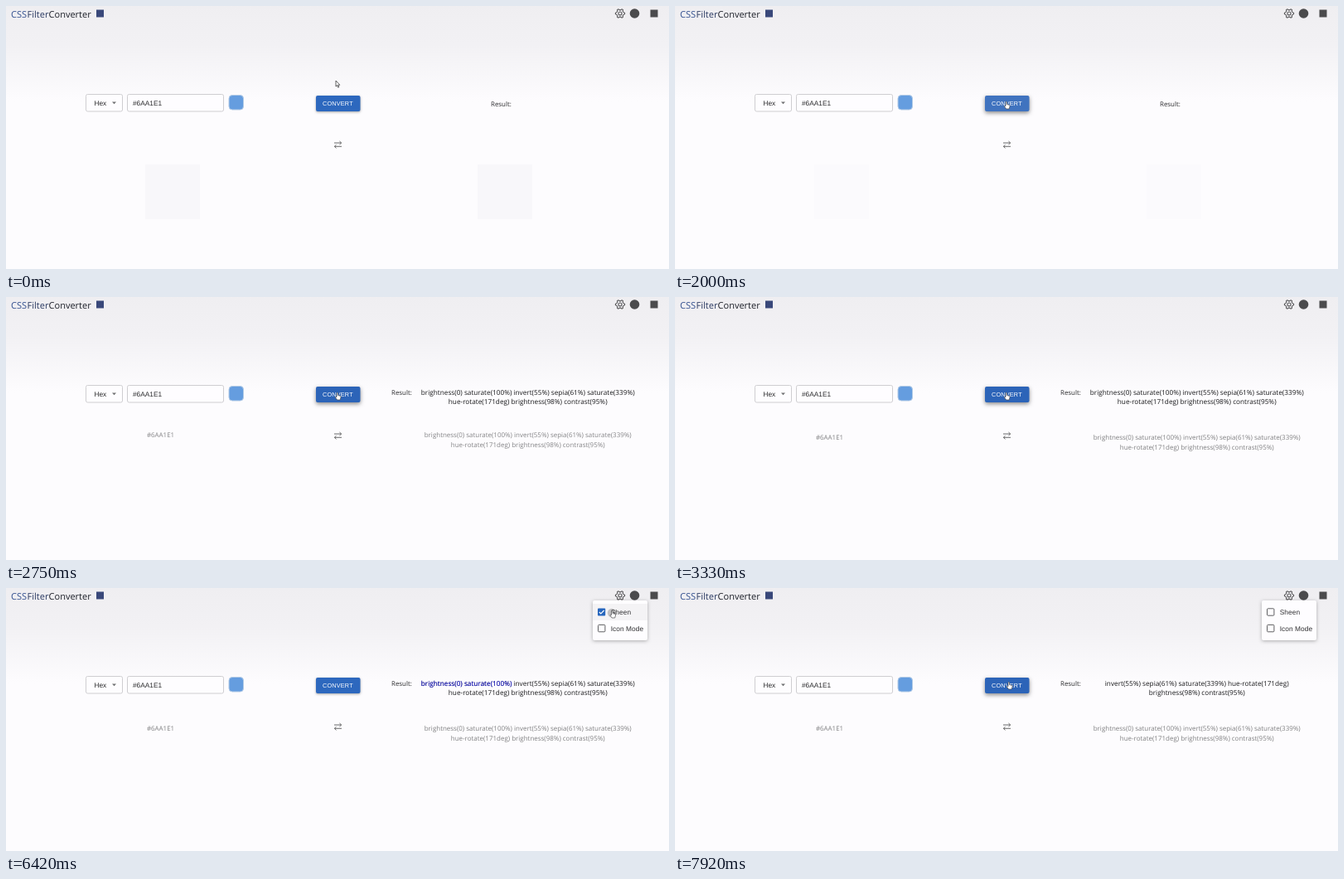
An HTML page with a canvas that plays this animation: 800x317 px, repeating every 8 s.

```html
<!DOCTYPE html>
<html lang="en">
<head>
<meta charset="utf-8">
<title>CSS Filter Converter</title>
<style>
  html, body { margin: 0; height: 100%; overflow: hidden; background: #fdfcfe; }
  canvas { display: block; }
</style>
</head>
<body>
<canvas width="800" height="317"></canvas>
<script>
const LOOP = 8000;
const ctx = document.querySelector('canvas').getContext('2d');
const UI = '"Liberation Sans", Arial, sans-serif';
const BODY = '"Open Sans", "Noto Sans", sans-serif';
const FILTER = ['brightness(0) saturate(100%) invert(55%) sepia(61%) saturate(339%)',
                'hue-rotate(171deg) brightness(98%) contrast(95%)'];
const SHORT = ['invert(55%) sepia(61%) saturate(339%) hue-rotate(171deg)',
               'brightness(98%) contrast(95%)'];
const BUTTON = [374, 108, 53.5, 19];
const GEAR = [734, 2, 14, 14];
const MENU = [708, 15, 66, 48];
const ROW = [708, 19, 66, 20];

const progress = (t, start, end) => Math.min(1, Math.max(0, (t - start) / (end - start)));
const smooth = p => p * p * (3 - 2 * p);
const easeOut = (p, power = 2) => 1 - (1 - p) ** power;

// cubic-bezier(.4, 0, .2, 1)
function standard(p) {
  let lo = 0, hi = 1;
  for (let i = 0; i < 14; i++) {
    const u = (lo + hi) / 2, v = 1 - u;
    if (1.2 * u * v * v + 0.6 * u * u * v + u ** 3 < p) lo = u; else hi = u;
  }
  return lo * lo * (3 - 2 * lo);
}

const moves = [
  { start: 1170, end: 1560, x: 399, y: 115, ease: smooth },
  { start: 3480, end: 4230, x: 738, y: 10, ease: smooth },
  { start: 4720, end: 5080, x: 730.5, y: 27, ease: smooth },
  { start: 6680, end: 7850, x: 402, y: 113, ease: easeOut },
];

function pointerAt(t) {
  let x = 398, y = 90;
  for (const m of moves) {
    const k = m.ease(progress(t, m.start, m.end));
    x += (m.x - x) * k;
    y += (m.y - y) * k;
  }
  return { x, y };
}

const inside = (p, [x, y, w, h]) => p.x >= x && p.x <= x + w && p.y >= y && p.y <= y + h;

function text(str, x, y, size, color, { font = UI, align = 'left', spacing = 0 } = {}) {
  ctx.font = `${size}px ${font}`;
  ctx.textAlign = align;
  ctx.letterSpacing = spacing + 'px';
  ctx.fillStyle = color;
  ctx.fillText(str, x, y);
}

function box(x, y, w, h, r, fill, stroke) {
  ctx.beginPath();
  ctx.roundRect(x, y, w, h, r);
  if (fill) { ctx.fillStyle = fill; ctx.fill(); }
  if (stroke) { ctx.strokeStyle = stroke; ctx.lineWidth = 1; ctx.stroke(); }
}

function disc(x, y, r, fill) {
  ctx.beginPath();
  ctx.arc(x, y, r, 0, 7);
  ctx.fillStyle = fill;
  ctx.fill();
}

function path(d, fill, stroke, width = 1) {
  const p = new Path2D(d);
  ctx.lineWidth = width;
  if (fill) { ctx.fillStyle = fill; ctx.fill(p); }
  if (stroke) { ctx.strokeStyle = stroke; ctx.stroke(p); }
}

function layer(alpha, draw) {
  ctx.save();
  ctx.globalAlpha = alpha;
  draw();
  ctx.restore();
}

function shadow(blur, dy, alpha) {
  ctx.shadowColor = `rgba(0,0,0,${alpha})`;
  ctx.shadowBlur = blur;
  ctx.shadowOffsetY = dy;
}

function ripple(area, x, y, radius, color) {
  ctx.save();
  ctx.beginPath();
  ctx.rect(...area);
  ctx.clip();
  disc(x, y, radius, color);
  ctx.restore();
}

function gear(color) {
  ctx.beginPath();
  for (let i = 0; i < 24; i++) {
    const a = (i + 0.5) * Math.PI / 12, r = i % 4 < 2 ? 5.6 : 4.2;
    ctx.lineTo(741 + r * Math.cos(a - 0.26), 9 + r * Math.sin(a - 0.26));
  }
  ctx.closePath();
  ctx.moveTo(743, 9);
  ctx.arc(741, 9, 2, 0, 7);
  ctx.strokeStyle = color;
  ctx.lineWidth = 1.1;
  ctx.stroke();
}

function header(gearColor) {
  const sheen = ctx.createLinearGradient(0, 0, 0, 115);
  sheen.addColorStop(0, '#efeef1');
  sheen.addColorStop(0.4, '#f2f1f4');
  sheen.addColorStop(1, '#fdfcfe');
  ctx.fillStyle = sheen;
  ctx.fillRect(0, 0, 800, 317);
  const font = { font: BODY };
  text('CSS', 6, 14, 11, '#33508f', font);
  text('Filter', 25.6, 14, 11, '#2b3a62', font);
  text('Converter', 51.6, 14, 11, '#1d2029', font);
  box(109, 4.5, 9, 9, 0, '#39487a');
  gear(gearColor);
  disc(758.5, 9, 5.8, '#4b4b4d');
  box(777.5, 4.5, 9, 9, 0, '#4b4b4d');
}

function form(hover, t) {
  box(96.5, 106.5, 44, 20.5, 2, '#fefdff', '#cfced1');
  text('Hex', 106.5, 119.5, 8.3, '#2a2a2c');
  path('M128 115.5h5l-2.5 2.7z', '#707072');
  box(146.5, 106.5, 116, 20.5, 2, '#fefdff', '#cfced1');
  text('#6AA1E1', 153, 119.5, 8.3, '#2a2a2c');
  box(269, 107.5, 17.5, 17.5, 4, '#659ddf', '#b3cbe6');

  ctx.save();
  shadow(hover ? 5 : 3, hover ? 2 : 1, hover ? 0.45 : 0.35);
  box(...BUTTON, 2, hover ? '#2c64b8' : '#2d68be');
  ctx.restore();
  const spread = progress(t, 1620, 2170);
  if (spread > 0 && spread < 1) {
    ripple(BUTTON, 400, 117, 4 + 40 * easeOut(spread), `rgba(255,255,255,${0.3 * (1 - spread)})`);
  }
  text('CONVERT', 382, 120.1, 7.26, '#fff', { spacing: 0.207 });
  path('M396 165h8.5M402.5 163l2.2 2l-2.2 2M405 169.3h-8.5M398.5 167.3l-2.2 2l2.2 2', null, '#58585a', 0.9);
}

function lines(rows, y, size, color) {
  rows.forEach((row, i) =>
    text(row, 629.7, y + i * 11.4, size, color, { font: BODY, align: 'center' }));
}

function results(t) {
  const shown = t >= 2170;
  text('Result:', shown ? 465 : 585, shown ? 118 : 120.5, 7.9, '#2b2b2d', { font: BODY });
  const marks = 1 - progress(t, 1750, 2250);
  if (marks) layer(marks, () => [201, 602].forEach(x => box(x - 33, 191, 66, 66, 0, '#f8f7fa')));

  layer(easeOut(progress(t, 2170, 2700)), () => {
    lines(t < 6500 ? FILTER : SHORT, 118, 8.23, '#1b1b1d');
    const blue = progress(t, 4950, 5150);
    if (blue && t < 6500) {
      ctx.font = `8.23px ${BODY}`;
      const left = 629.7 - ctx.measureText(FILTER[0]).width / 2;
      ctx.globalAlpha *= blue;
      text('brightness(0) saturate(100%)', left, 118, 8.23, '#3030ee', { font: BODY });
    }
  });

  const p = progress(t, 2330, 3000);
  layer(easeOut(p, 3), () => {
    const y = 172.4 - 22 * (1 - p) ** 2;
    text('#6AA1E1', 186.5, y, 7.95, '#808082', { font: BODY, align: 'center' });
    lines(FILTER, y, 7.98, '#808082');
  });
}

function checkbox(y, checked) {
  if (!checked) return box(714.5, y - 4.2, 8.4, 8.4, 1, null, '#5f5f61');
  box(714, y - 4.6, 9.2, 9.2, 1, '#2666bd');
  path(`M715.8 ${y}l2 2l3.8 -4`, null, '#fff', 1.1);
}

function menu(t, hoverRow) {
  if (t < 4407) return;
  const grow = standard(progress(t, 4407, 4593));
  layer(standard(progress(t, 4407, 4687)), () => {
    ctx.translate(740, 15);
    ctx.scale(0.75 + 0.25 * grow, 0.5625 + 0.4375 * grow);
    ctx.translate(-740, -15);
    ctx.save();
    shadow(4, 1, 0.3);
    box(...MENU, 2, '#fefdff');
    ctx.restore();
    if (hoverRow) box(...ROW, 0, '#f4f3f5');
    const spread = progress(t, 6385, 6935);
    if (spread > 0 && spread < 1) {
      ripple(ROW, 731, 30, 3 + 34 * spread, `rgba(0,0,0,${0.22 * (1 - spread)})`);
    }
    checkbox(29, t < 6500);
    checkbox(48.6, false);
    text('Sheen', 729.7, 32, 8.3, '#303032', { spacing: 0.078 });
    text('Icon Mode', 729.7, 51.6, 8.3, '#303032', { spacing: 0.078 });
  });
}

function pointer({ x, y }, hand) {
  ctx.save();
  ctx.translate(x, y);
  ctx.lineJoin = 'round';
  if (hand) {
    path('M0 .8Q.8 -.3 1.5 .8V3.6L4.6 4.3Q5.3 4.7 5 6L4.2 9H.6L-1.6 6Q-1.6 4.8 0 5.6Z', '#fff', '#4a4a4c', 0.7);
  } else {
    path('M0 0V7L1.6 5.6L2.7 8.2L3.8 7.7L2.7 5.2H4.8Z', '#fff', '#3a3a3c', 0.8);
  }
  ctx.restore();
}

function draw(now) {
  const t = now % LOOP;
  const at = pointerAt(t);
  const onButton = inside(at, BUTTON);
  const onGear = inside(at, GEAR);
  const onMenu = t > 4407 && inside(at, MENU);
  ctx.textRendering = 'geometricPrecision';
  header(onGear ? '#1c1c1e' : '#58585a');
  form(onButton, t);
  results(t);
  menu(t, onMenu && inside(at, ROW));
  pointer(at, onButton || onGear || onMenu);
  requestAnimationFrame(draw);
}
requestAnimationFrame(draw);
</script>
</body>
</html>
```
